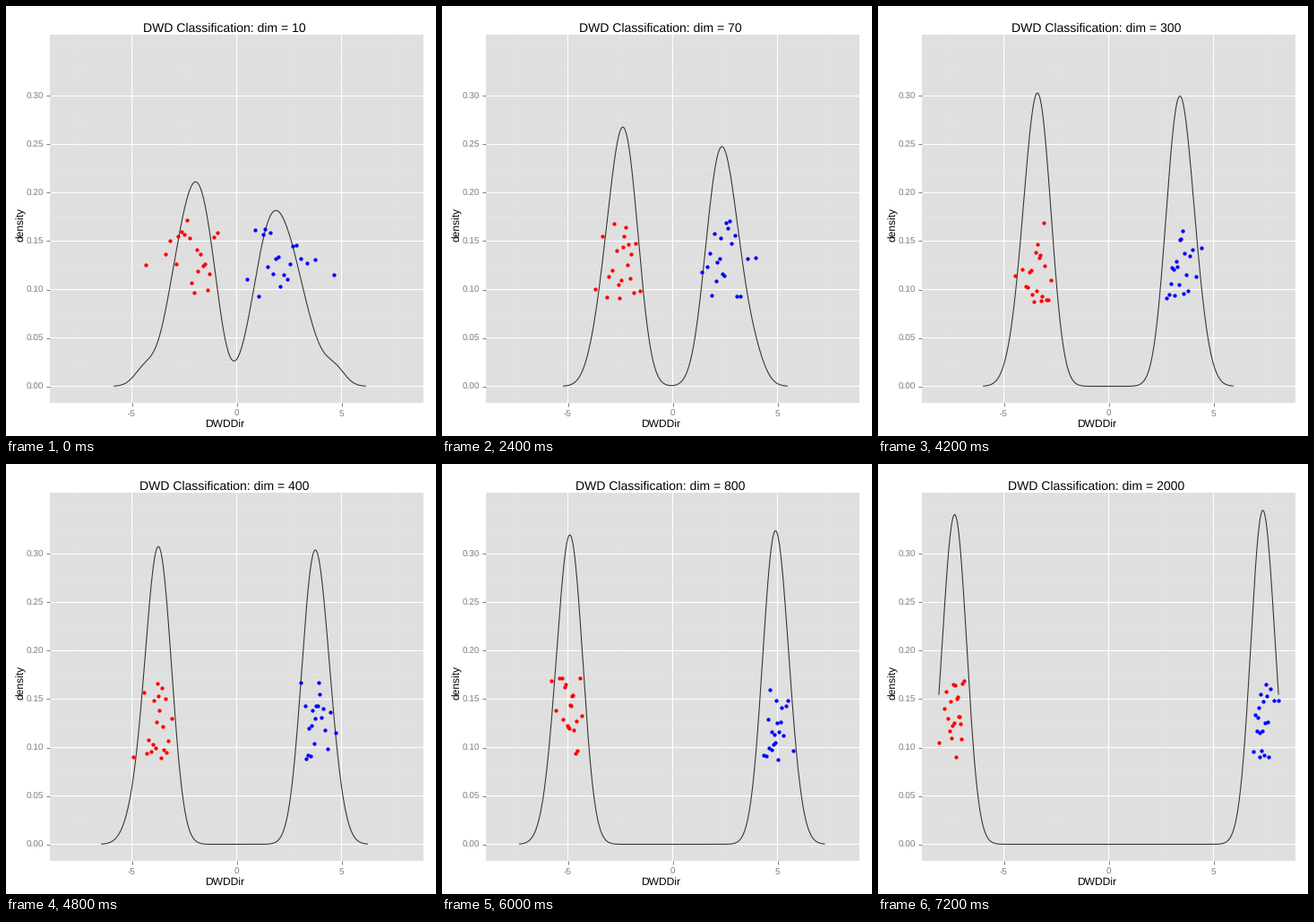
These frames come from a looping animation (480x480 px, 7.8 s). A matplotlib script:

```python
import matplotlib.pyplot as plt
import numpy as np
from matplotlib.animation import FuncAnimation

plt.rcParams.update({"font.family": "Liberation Sans",
                     "text.hinting": "none", "text.hinting_factor": 1})

SIZE, DPI = 480, 72
DIMS = [10, 20, 30, 50, 70, 100, 200, 300, 400, 600, 800, 1000, 2000]
COUNT = 20         # dots per class
LIMIT = 8.1        # the density is only evaluated inside +-LIMIT
BANDWIDTH = 0.5
SKEW = 0.25        # both classes have their longer tail on the outside


def normal_scores(rng):
    """Evenly spread, slightly jittered quantiles of a normal sample."""
    p = (np.arange(COUNT) + rng.uniform(0.25, 0.75, COUNT)) / COUNT
    z = 4.91 * (p**0.14 - (1 - p)**0.14)
    return z + SKEW * (z**2 - 1) / 2


def projections(dim, rng):
    """Red and blue positions: they drift apart and tighten with dim."""
    centre = np.sqrt(4.5 + 0.025 * dim)
    red = -centre - 1.24 * dim**-0.18 * normal_scores(rng)
    blue = centre + 1.75 * dim**-0.235 * normal_scores(rng)
    return np.clip(red, -LIMIT, None), np.clip(blue, None, LIMIT)


def density(x):
    reach = 3 * BANDWIDTH
    grid = np.linspace(max(x.min() - reach, -LIMIT),
                       min(x.max() + reach, LIMIT), 512)
    z = (grid[:, None] - x) / BANDWIDTH
    height = np.exp(-z**2 / 2).mean(axis=1) / (BANDWIDTH * np.sqrt(2 * np.pi))
    return grid, height


fig = plt.figure(figsize=(SIZE / DPI, SIZE / DPI), dpi=DPI, facecolor="white")


def label(x, y, text, size, **kw):
    return fig.text(x / SIZE, 1 - y / SIZE, text, fontsize=size,
                    color="black", **{"ha": "center", "va": "baseline", **kw})


# Panel from (49, 32) to (466, 443) pixels.
ax = fig.add_axes([49 / SIZE, 37 / SIZE, 417 / SIZE, 411 / SIZE],
                  facecolor="#dfdfdf")
ax.set_xlim(-208.5 / 23.4, 208.5 / 23.4)
ax.set_ylim(-18.5 / 1080, 392.5 / 1080)
for spine in ax.spines.values():
    spine.set_visible(False)

ax.set_xticks([-5, 0, 5], ["-5", "0", "5"])
ax.set_xticks([-7.5, -2.5, 2.5, 7.5], minor=True)
levels = np.arange(7) * 0.05
ax.set_yticks(levels, [f"{v:.2f}" for v in levels])
ax.set_yticks(np.append(levels + 0.025, 0.35), minor=True)
ax.tick_params(which="major", length=4.3, width=1, color="#7f7f7f",
               labelcolor="#7f7f7f", labelsize=9.6)
ax.tick_params(axis="x", pad=3.6)
ax.tick_params(axis="y", pad=2.2)
ax.tick_params(which="minor", length=0)
ax.set_axisbelow(True)
ax.grid(which="minor", color="#e8e8e8", linewidth=0.6)
ax.grid(which="major", color="white", linewidth=1.1)
for axis in (ax.xaxis, ax.yaxis):
    for tick in axis.get_major_ticks() + axis.get_minor_ticks():
        tick.gridline.set_snap(False)

title = label(244, 29, "", 14.4)
label(244, 470, "DWDDir", 12)
label(22.5, 244, "density", 12, rotation=90, ha="right", va="center")

curve, = ax.plot([], [], color="#333333", linewidth=1.07)
dot = dict(linestyle="none", marker="o", markersize=4.3, markeredgewidth=0)
red_dots, = ax.plot([], [], color="#ff0000", **dot)
blue_dots, = ax.plot([], [], color="#0000ff", **dot)


def draw(i):
    dim = DIMS[i]
    rng = np.random.default_rng(dim)
    red, blue = projections(dim, rng)
    title.set_text(f"DWD Classification: dim = {dim}")
    curve.set_data(*density(np.concatenate([red, blue])))
    red_dots.set_data(red, rng.uniform(0.087, 0.173, COUNT))
    blue_dots.set_data(blue, rng.uniform(0.087, 0.173, COUNT))
    return title, curve, red_dots, blue_dots


anim = FuncAnimation(fig, draw, frames=len(DIMS), interval=600,
                     repeat=True, repeat_delay=0, blit=False)
plt.show()
```
